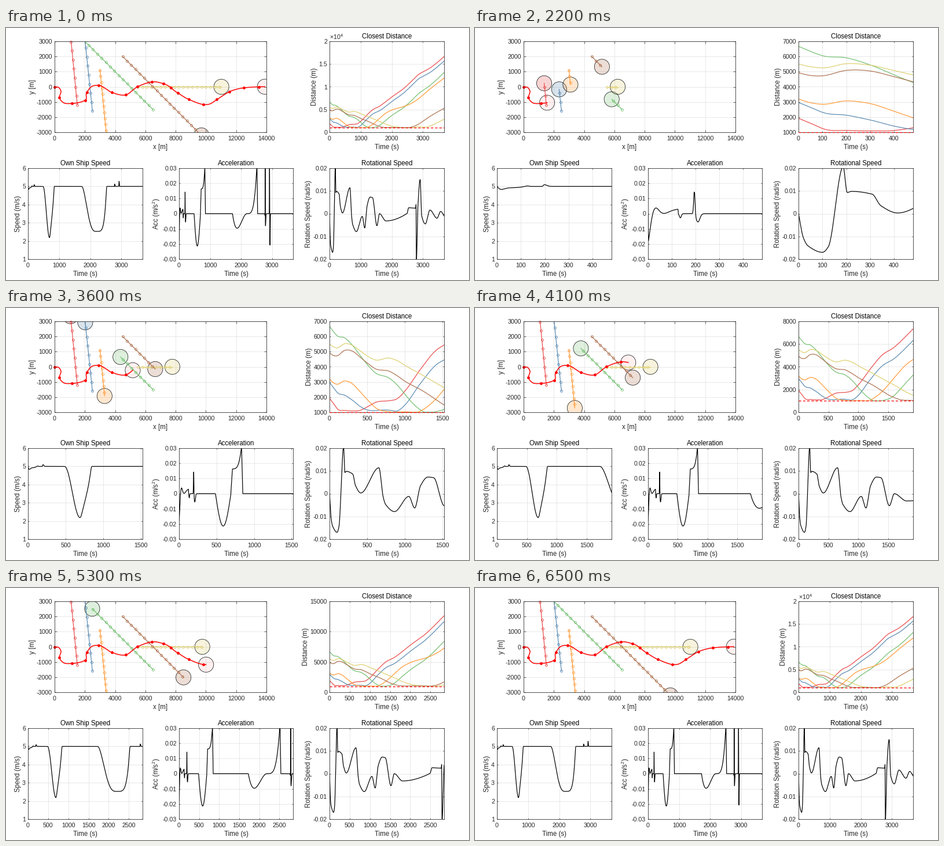
A matplotlib script that plays this animation: 800 px wide and 435 px high, repeating every 6800 ms.

```python
import matplotlib.pyplot as plt
import numpy as np
from matplotlib.animation import FuncAnimation
from matplotlib.patches import Circle

W, H, DPI = 800, 435, 72  # at 72 dpi one point is one pixel
FRAMES, INTERVAL = 68, 100
T_END, DT, MARK = 3680, 2, 200
INK = "#262626"

plt.rcParams.update({
    "font.family": "Liberation Sans", "font.size": 10.6,
    "axes.titlesize": 11.5, "axes.labelsize": 11.5,
    "axes.unicode_minus": False, "mathtext.default": "regular",
    "axes.edgecolor": INK, "axes.labelcolor": INK, "axes.linewidth": 0.8,
    "xtick.color": INK, "ytick.color": INK,
    "lines.solid_joinstyle": "round",
})

t = np.arange(0, T_END + DT, DT, dtype=float)


def bump(center, width, height):
    return height * np.exp(-((t - center) / width) ** 2 / 2)


def ramp(start, end):
    return np.clip((t - start) / (end - start), 0, 1)


def slow_down(drop, rise):
    """Brake along drop, scaled so that rise restores the speed."""
    return rise - drop * rise.sum() / drop.sum()


def curve(x, y, slope):
    """Cubic through the points with the given slopes."""
    h = np.diff(x)
    i = np.clip(np.searchsorted(x, t, "right") - 1, 0, len(h) - 1)
    s = (t - x[i]) / h[i]
    return ((1 + 2 * s) * (1 - s) ** 2 * y[i] + s * (1 - s) ** 2 * h[i] * slope[i]
            + s * s * (3 - 2 * s) * y[i + 1]
            + s * s * (s - 1) * h[i] * slope[i + 1])


def eased(points):
    """Cubic that is level at each extreme and never overshoots."""
    x, y = np.array(points, float).T
    d = np.diff(y) / np.diff(x)
    slope = np.r_[d[0], np.zeros(len(d) - 1), d[-1]]
    same = np.flatnonzero(d[:-1] * d[1:] > 0)
    slope[same + 1] = 2 / (1 / d[same] + 1 / d[same + 1])
    return curve(x, y, slope)


# acceleration: start-up swing, small corrections, two slow-downs, two jolts
acc = -0.0198 * np.exp(-t / 22) * np.cos(np.pi * t / 40) * ramp(0, 2)
acc += 0.003 * ramp(50, 127) * (t < 128) + bump(136, 4, -0.0028)
acc += bump(195, 2.8, 0.016) + bump(210, 8, -0.0055)
acc += slow_down(
    np.sin(np.pi * ramp(485, 692)),
    (0.0163 + 0.015 * ramp(700, 833) ** 4) * ramp(690, 712) * (1 - ramp(833, 850)))
brake = ramp(1725, 2190)
acc += slow_down(
    brake * (1 - brake) ** 2.1,
    0.033 * ramp(2190, 2515) ** 4 * (1 - ramp(2515, 2535)))
acc += bump(2780, 2, 0.036) + bump(2790, 9, -0.008)
acc += bump(2920, 3.5, 0.036) + bump(2935, 6, -0.021)
speed = 5 + np.cumsum(acc) * DT

# rate of turn, in thousandths of rad/s
turn = eased([
    (0, 0), (20, -10.5), (40, -14.2), (100, -17), (125, -14.5), (187, 20.6),
    (204, 9.3), (222, 9.8), (308, 8.6), (345, 3.5), (415, 0.3), (655, 11.4),
    (712, -1.5), (745, -4.8), (862, -7.9), (1052, -1.2), (1130, -6.3),
    (1207, 3.5), (1304, 7.3), (1382, 7), (1522, -5.3), (1605, 0),
    (1808, -3.2), (2490, 0.1), (2540, 2.6), (2766, 2.4), (2778, 4),
    (2788, -21), (2840, 3.7), (2910, 15), (2960, -1), (3076, -4.5),
    (3225, 1.6), (3450, -2), (3570, 1), (3680, -1),
]) / 1000

# own ship passes these points: time, x, y
when, *place = np.array([
    (0, 0, 0), (50, 249, -34), (100, 409, -241), (200, 325, -726),
    (300, 631, -1070), (400, 1148, -1097), (500, 1645, -1030), (600, 2027, -879),
    (800, 2142, -344), (900, 2448, 19), (1000, 2907, 96), (1200, 3768, -363),
    (1400, 4686, -535), (1600, 5489, 10), (1800, 6445, 325), (2000, 7191, 205),
    (2400, 8147, -413), (2600, 8874, -833), (2900, 10289, -1119),
    (3000, 10729, -840), (3200, 11571, -317), (3600, 13494, 0), (3680, 13896, 8),
], float).T
own = np.column_stack([curve(when, p, np.gradient(p, when)) for p in place])

# other ships: start, speed, course in degrees, colour
SHIPS = [
    ((1500, -1200), 3, 95.6, (0.915, 0.282, 0.288)),
    ((2500, -1600), 3, 96, (0.347, 0.536, 0.691)),
    ((6500, -1500), 2, 135, (0.442, 0.749, 0.432)),
    ((3000, 1100), 2, -84.3, (1.0, 0.598, 0.2)),
    ((5500, 0), 1.5, 0, (0.865, 0.811, 0.433)),
    ((4500, 2000), 2, -45, (0.677, 0.445, 0.311)),
]


def straight(start, pace, course):
    a = np.radians(course)
    return np.array(start) + pace * t[:, None] * np.array([np.cos(a), np.sin(a)])


tracks = [straight(*s[:3]) for s in SHIPS]
gaps = [np.maximum(np.hypot(*(own - tr).T), 1005) for tr in tracks]

fig = plt.figure(figsize=(W / DPI, H / DPI), dpi=DPI, facecolor="white")


def panel(left, right, top, title, xlabel, ylabel, ylim=None, step=None):
    ax = fig.add_axes([left / W, 1 - (top + 157) / H, (right - left) / W, 157 / H])
    ax.set_title(title, pad=4.8, color="black")
    ax.set_xlabel(xlabel, labelpad=4)
    ax.set_ylabel(ylabel, labelpad=1.5)
    ax.grid(True, color="#dfdfdf", lw=0.7)
    ax.set_axisbelow(True)
    ax.tick_params(direction="in", top=True, right=True, width=0.7,
                   length=(right - left) / 100)
    ax.tick_params(axis="x", pad=5.8)
    ax.tick_params(axis="y", pad=4)
    if ylim:
        set_yaxis(ax, *ylim, step)
    return ax


def set_yaxis(ax, lo, hi, step, unit=1):
    ticks = lo + step * np.arange(round((hi - lo) / step) + 1)
    ax.set_ylim(lo, hi)
    ax.set_yticks(ticks, [f"{round(v / unit, 6) + 0:g}" for v in ticks])


def set_time(ax, end):
    step = next(m * 10 ** e for e in range(4) for m in (1, 2, 5)
                if end / (m * 10 ** e) < 6)
    ticks = np.arange(0, end + 1, step)
    ax.set_xlim(0, end)
    ax.set_xticks(ticks, [f"{v:d}" for v in ticks])


sea = panel(84, 450, 23, "", "x [m]", "y [m]", (-3000, 3000), 1000)
sea.set_xlim(0, 14000)
sea.set_xticks(range(0, 14001, 2000))
dist = panel(559, 757, 23, "Closest Distance", "Time (s)", "Distance (m)")
plots = [
    (panel(38, 236, 242, "Own Ship Speed", "Time (s)", "Speed (m/s)",
           (1, 6), 1), speed),
    (panel(299, 496, 242, "Acceleration", "Time (s)", "Acc (m/s$^2$)",
           (-0.03, 0.03), 0.01), acc),
    (panel(559, 757, 242, "Rotational Speed", "Time (s)",
           "Rotation Speed (rad/s)", (-0.02, 0.02), 0.01), turn),
]
curves = [(ax.plot([], [], color="black", lw=1.2)[0], y) for ax, y in plots]
curves += [(dist.plot([], [], color=s[3], lw=1.2)[0], g)
           for s, g in zip(SHIPS, gaps)]
limit, = dist.plot([], [], color="red", lw=1.3, dashes=(3.2, 2.4), zorder=3,
                   clip_on=False)
power = dist.text(0, 1.02, "×10$^4$", transform=dist.transAxes, color=INK)


class Vessel:
    def __init__(self, track, color, lw, fill, alpha, z):
        self.track = track
        self.line, = sea.plot([], [], color=color, lw=lw, zorder=z)
        self.dots, = sea.plot([], [], "o", ms=4, mec=color, mfc=fill,
                              mew=0.8, clip_on=False, zorder=z + 0.1)
        self.disc = Circle((0, 0), 500, fc=(*color, alpha), ec=(0, 0, 0, 0.85),
                           lw=0.8, zorder=z - 0.4)
        sea.add_patch(self.disc)

    def show(self, n):
        path = self.track[:n]
        marks = path[::MARK // DT]
        marks = marks[np.abs(marks[:, 1]) <= 3000]
        self.line.set_data(*path.T)
        self.dots.set_data(*marks.T)
        self.disc.center = path[-1]


vessels = [Vessel(tr, s[3], 1.2, "none", 0.23, 2) for tr, s in zip(tracks, SHIPS)]
vessels.append(Vessel(own, (1.0, 0.0, 0.0), 1.5, "red", 0.06, 2.2))


def sim_time(k):
    """The finished run stands first, then the run plays from its start."""
    if k < 15:
        return T_END
    end = np.interp(k, [15, 17, 22, 30, 41, 53, 65],
                    [10, 40, 480, 1080, 1920, 2840, T_END])
    q = 40 if end > 40 else 10
    return int(q * round(end / q))


def update(k):
    end = sim_time(k)
    n = end // DT + 1
    for v in vessels:
        v.show(n)
    for line, y in curves:
        line.set_data(t[:n], y[:n])
    limit.set_data([0, end], [1000, 1000])
    for ax in [dist] + [p[0] for p in plots]:
        set_time(ax, end)

    far = max(g[:n].max() for g in gaps)
    lo, hi, step = next(r for r in [
        (1000, 7000, 1000), (0, 8000, 2000), (0, 10000, 2000),
        (0, 12000, 2000), (0, 15000, 5000), (0, 20000, 5000)] if far <= r[1])
    big = hi >= 20000
    set_yaxis(dist, lo, hi, step, 1e4 if big else 1)
    power.set_visible(big)
    return []


anim = FuncAnimation(fig, update, frames=FRAMES, init_func=lambda: [],
                     interval=INTERVAL, repeat=True, repeat_delay=0, blit=False)
plt.show()
```
